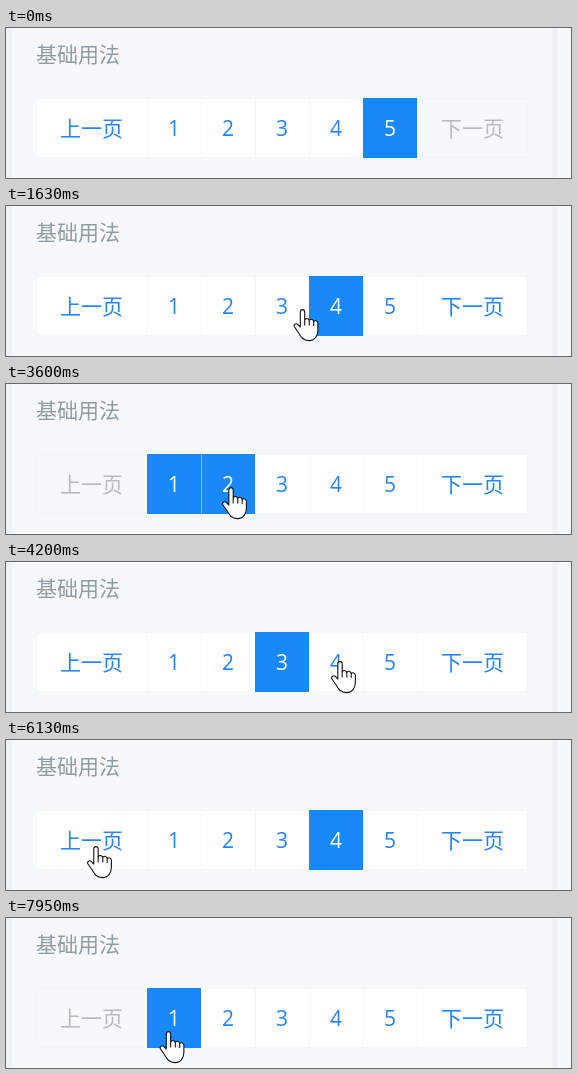
Write an HTML page that moves like this. It is 565 px wide and 150 px high and loops after 8 s.

```html
<!DOCTYPE html>
<html lang="zh-CN">
<head>
<meta charset="utf-8">
<title>分页</title>
<style>
  html, body { margin: 0; width: 100%; height: 100%; overflow: hidden; background: #f7f8fa; }
  svg { display: block; width: 565px; height: 150px; }
  text { font: 21px "Open Sans", "Noto Sans CJK SC", "Noto Sans CJK", sans-serif; }
  .cjk { font-weight: 300; font-family: "Noto Sans CJK SC", "Noto Sans CJK", sans-serif; }
  .cell text { text-anchor: middle; fill: #2483f7; }
  .cell .face { fill: #fff; }
  .cell .line { fill: #ebedf0; fill-opacity: .5; }
  .cell.blue .face { fill: #1989fa; }
  .cell.blue text { fill: #fff; }
  .cell.blue .line { display: none; }
  .cell.blue + .cell.blue .left { display: inline; }
  .cell.disabled { opacity: .5; }
  .cell.disabled .face { fill: #f7f8fa; }
  .cell.disabled text { fill: #7d7e80; }
  .pointer { fill: #fff; stroke: #111; stroke-width: 1.1; stroke-linejoin: round; stroke-linecap: round; }
</style>
</head>
<body>
<svg viewBox="0 0 565 150">
  <path d="M0 0H6V150H0ZM546 0H552V150H546Z" fill="#f1f2f5"/>
  <text class="cjk" x="30" y="34" fill="#8f9ca2">基础用法</text>
  <g id="cells"></g>
  <g id="cursor">
    <path id="arrow" class="pointer" d="M.6 .8V24.5L6 19.3L10 27.6L13.6 26L10 17.9H17.3Z"/>
    <g id="hand" class="pointer">
      <path d="M-2.2 18V2.8Q-2 .6 0 .6T2.2 2.8V10.7Q4.6 8 6.8 11.2Q9.6 8.8 11.2 12.2Q14.6 10.8 15.4 14V21C15.4 26 13 31.6 6.5 31.6C.5 31.6 -1.6 28 -4 23.8L-8 18C-9.4 15.4 -6.4 13.8 -4.5 15.7Z"/>
      <path d="M2.2 10.7V16M6.8 11.2V16M11.2 12.2V16.5" fill="none"/>
    </g>
    <g id="blocked" fill="none">
      <circle r="9" stroke="#fff" stroke-width="5"/>
      <path d="M-6.4 -6.4L6.4 6.4" stroke="#fff" stroke-width="5"/>
      <circle r="9" stroke="#111" stroke-width="2.6"/>
      <path d="M-6.4 -6.4L6.4 6.4" stroke="#111" stroke-width="2.6"/>
    </g>
  </g>
</svg>
<script>
const LOOP = 8000, PAGES = 5, TOP = 70, HEIGHT = 60;
const LEFT = 30, FIRST_PAGE = 141, PAGE_WIDTH = 54, RIGHT = 522;
const HOLD = 100, ENTER = 270;
const byId = id => document.getElementById(id);

const pageEdges = Array.from({ length: PAGES + 1 }, (_, i) => FIRST_PAGE + PAGE_WIDTH * i);
const edges = [LEFT, ...pageEdges, RIGHT];
const labels = ['上一页', ...pageEdges.slice(1).map((_, i) => i + 1), '下一页'];
const cellAt = x => edges.findIndex((edge, i) => x >= edge && x < edges[i + 1]);

const rect = (cls, x, y, w, h) =>
  `<rect class="${cls}" x="${x}" y="${y}" width="${w}" height="${h}"/>`;

byId('cells').innerHTML = labels.map((label, i) => {
  const x = edges[i], w = edges[i + 1] - x, isText = i === 0 || i > PAGES;
  return `<g class="cell">
    ${rect('face', x, TOP, w, HEIGHT)}
    ${rect('line left', x, TOP, 1, HEIGHT)}
    ${rect('line', x + 1, TOP, w - 1, 1)}
    ${rect('line', x + 1, TOP + HEIGHT - 1, w - 1, 1)}
    ${i > PAGES ? rect('line', RIGHT - 1, TOP + 1, 1, HEIGHT - 2) : ''}
    <text class="${isText ? 'cjk' : ''}" x="${x + w / 2}" y="108">${label}</text></g>`;
}).join('');
const cells = [...document.querySelectorAll('.cell')];

const moves = [], clicks = [];

function go(start, end, [x, y], bow = 0) {
  moves.push({ start, end, x, y, bow });
}

// Clicks each point in turn; curve below 1 speeds the clicks up, above 1 slows them down.
function clickAlong(first, last, curve, points) {
  let leave;
  points.forEach((point, i) => {
    const time = first + (last - first) * (i / (points.length - 1)) ** curve;
    if (i) go(leave, leave + 60 + 2 * Math.abs(point[0] - points[i - 1][0]), point);
    clicks.push({ time, cell: cellAt(point[0]) });
    leave = time + HOLD + 20;
  });
}

const down = [[321, 97], [296.5, 103], [225, 107], [166.5, 107]];
const up = [[225, 103], [279, 101], [334, 99], [379, 99]];
const prev = [90, 106];

go(ENTER, 980, down[0]);
clickAlong(1120, 2550, .8, down);
go(2720, 3080, [86, 106], 10);
go(3080, 3410, up[0]);
clickAlong(3600, 5250, 1.6, up);
go(5360, 6000, prev, 7);
clickAlong(6030, 7400, 1.1, Array(4).fill(prev));
go(7850, 7950, [162.5, 113]);

function cursorAt(t) {
  let x = 147, y = 147;
  for (const move of moves) {
    if (t < move.start) break;
    const u = Math.min(1, (t - move.start) / (move.end - move.start));
    const k = u * u * (3 - 2 * u);
    x += (move.x - x) * k;
    y += (move.y - y) * k + move.bow * Math.sin(Math.PI * k);
  }
  return [x, y];
}

function render(t) {
  let page = PAGES, pressed = -1;
  for (const { time, cell } of clicks) {
    if (t >= time + HOLD) page = cell || page - 1;
    else if (t >= time) pressed = cell;
  }
  const isDisabled = i => (i === 0 && page === 1) || (i > PAGES && page === PAGES);
  cells.forEach((cell, i) => {
    cell.classList.toggle('blue', i === page || i === pressed);
    cell.classList.toggle('disabled', isDisabled(i));
  });

  const [x, y] = cursorAt(t);
  const hovered = y < TOP + HEIGHT ? cellAt(x) : -1;
  const shape = hovered < 0 ? 'arrow' : isDisabled(hovered) ? 'blocked' : 'hand';
  for (const id of ['arrow', 'hand', 'blocked']) byId(id).style.display = id === shape ? '' : 'none';
  byId('cursor').style.display = t < ENTER ? 'none' : '';
  byId('cursor').setAttribute('transform', `translate(${x} ${y})`);
}

const startTime = performance.now();
function tick() {
  render((performance.now() - startTime) % LOOP);
  requestAnimationFrame(tick);
}
tick();
</script>
</body>
</html>
```
